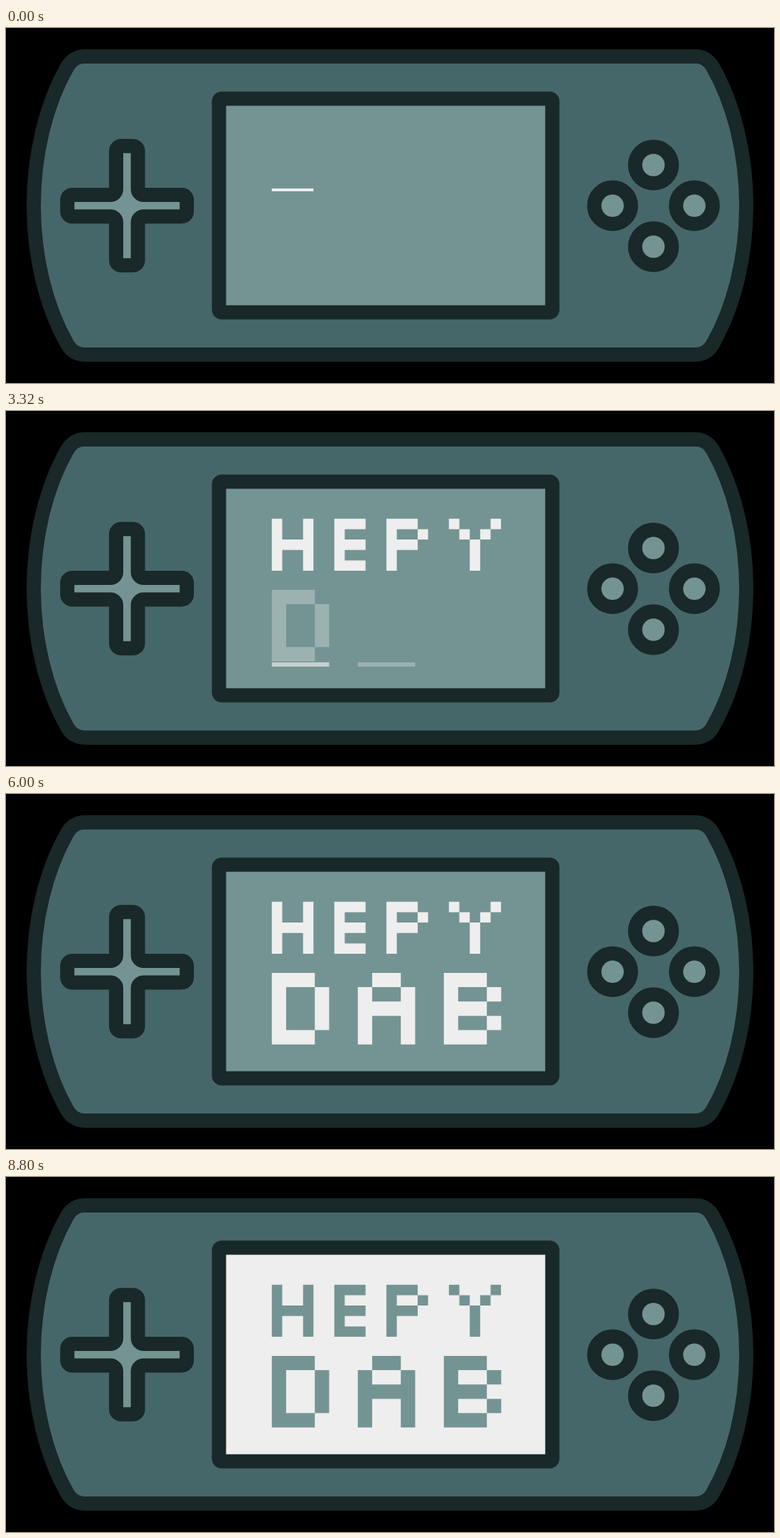
An HTML page for the animation above (9 s loop, 1080x500 px).

```html
<!DOCTYPE html>
<html lang="en">
<head>
<meta charset="utf-8">
<title>Handheld console</title>
<style>
  html, body { margin: 0; width: 100%; height: 100%; overflow: hidden; background: #000; }
  svg { display: block; width: 100vw; height: 100vh; }
  .line { stroke: #192828; stroke-width: 20; }
  .body { fill: #466769; }
  .lit { fill: #749493; }
  #screen { --paper: #749493; --ink: #eee; }
  #screen.inverted { --paper: #eee; --ink: #749493; }
  #panel { fill: var(--paper); }
  #text { fill: var(--ink); }
</style>
</head>
<body>
<svg viewBox="0 0 1080 500">
  <path class="line body" d="M110 40H970C980 40 989 45.500 994 55C1024 108 1041 178 1041 250S1024 392 994 445C989 454.500 980 460 970 460H110C100 460 91 454.500 86 445C56 392 39 322 39 250S56 108 86 55C91 45.500 100 40 110 40Z"/>
  <path class="line lit" transform="translate(170.2 250.2)" d="M-15.3-23.3V-77a7 7 0 0 1 7-7h16.6a7 7 0 0 1 7 7V-23.3a8 8 0 0 0 8 8H77a7 7 0 0 1 7 7v16.6a7 7 0 0 1-7 7H23.3a8 8 0 0 0-8 8V77a7 7 0 0 1-7 7h-16.6a7 7 0 0 1-7-7V23.3a8 8 0 0 0-8-8H-77a7 7 0 0 1-7-7v-16.6a7 7 0 0 1 7-7H-23.3a8 8 0 0 0 8-8z"/>
  <g class="line lit">
    <circle cx="910.5" cy="193" r="25.8"/>
    <circle cx="853" cy="250.3" r="25.8"/>
    <circle cx="968" cy="250.3" r="25.8"/>
    <circle cx="910.5" cy="308" r="25.8"/>
  </g>
  <g id="screen">
    <rect id="panel" class="line" x="299.5" y="99.4" width="468.8" height="301.2" rx="4"/>
    <g id="text" role="img" aria-label="HEPY DAB"></g>
  </g>
</svg>
<script>
const LOOP = 9000, STEP = 40, FADE_STEPS = 3;

// Five rows of pixels per letter
const glyphs = {
  H: '1001 1001 1111 1001 1001',
  E: '111 100 111 100 111',
  P: '1110 1001 1110 1000 1000',
  Y: '10001 01010 00100 00100 00100',
  D: '1110 1001 1001 1001 1110',
  A: '0110 1001 1111 1001 1001',
  B: '1110 1001 1110 1001 1110'
};
const lines = [
  { word: 'HEPY', top: 151.8, cell: 14.65, cursorY: 226, cursorH: 4 },
  { word: 'DAB', top: 251.9, cell: 20.16, cursorY: 354, cursorH: 6 }
];
const typedAt = [600, 1280, 1960, 2640, 3320, 3920, 4600];

const screenEl = document.getElementById('screen');
const textEl = document.getElementById('text');

function addPath(d) {
  const path = document.createElementNS('http://www.w3.org/2000/svg', 'path');
  path.setAttribute('d', d);
  return textEl.appendChild(path);
}

const box = (x, y, w, h) => `M${x} ${y}h${w}v${h}h${-w}z`;

function glyphPath(rows, x, y, cell) {
  let d = '';
  rows.forEach((row, j) => {
    for (const run of row.matchAll(/1+/g)) {
      d += box(x + run.index * cell, y + j * cell, run[0].length * cell, cell);
    }
  });
  return d;
}

const slots = [];
for (const { word, top, cell, cursorY, cursorH } of lines) {
  let x = 373.8;
  for (const ch of word) {
    const rows = glyphs[ch].split(' ');
    const cols = rows[0].length;
    const cursorX = x + (cols - 4) * cell / 2;
    slots.push({
      letter: addPath(glyphPath(rows, x, top, cell)),
      cursor: addPath(box(cursorX, cursorY, 4 * cell, cursorH))
    });
    x += (cols + 2) * cell;
  }
}

function typed(i, t) {
  if (i < 0) return 1;
  const n = Math.floor((t - typedAt[i]) / STEP) + 1;
  return Math.max(0, Math.min(1, n / FADE_STEPS));
}

// Slow blinking, a short rest, then a quick burst
function inverted(t) {
  if (t < 4800) return false;
  const k = t < 8160 ? Math.floor((t - 4800) / 240)
    : t < 8320 ? 1
    : Math.min(4, Math.floor((t - 8320) / 120));
  return k % 2 === 0;
}

function draw(now) {
  const t = now % LOOP;
  slots.forEach(({ letter, cursor }, i) => {
    const shown = typed(i, t);
    letter.style.opacity = shown;
    cursor.style.opacity = Math.max(0, typed(i - 1, t) - shown);
  });
  screenEl.classList.toggle('inverted', inverted(t));
}

const start = performance.now();
function tick() {
  draw(performance.now() - start);
  requestAnimationFrame(tick);
}
tick();
</script>
</body>
</html>
```
